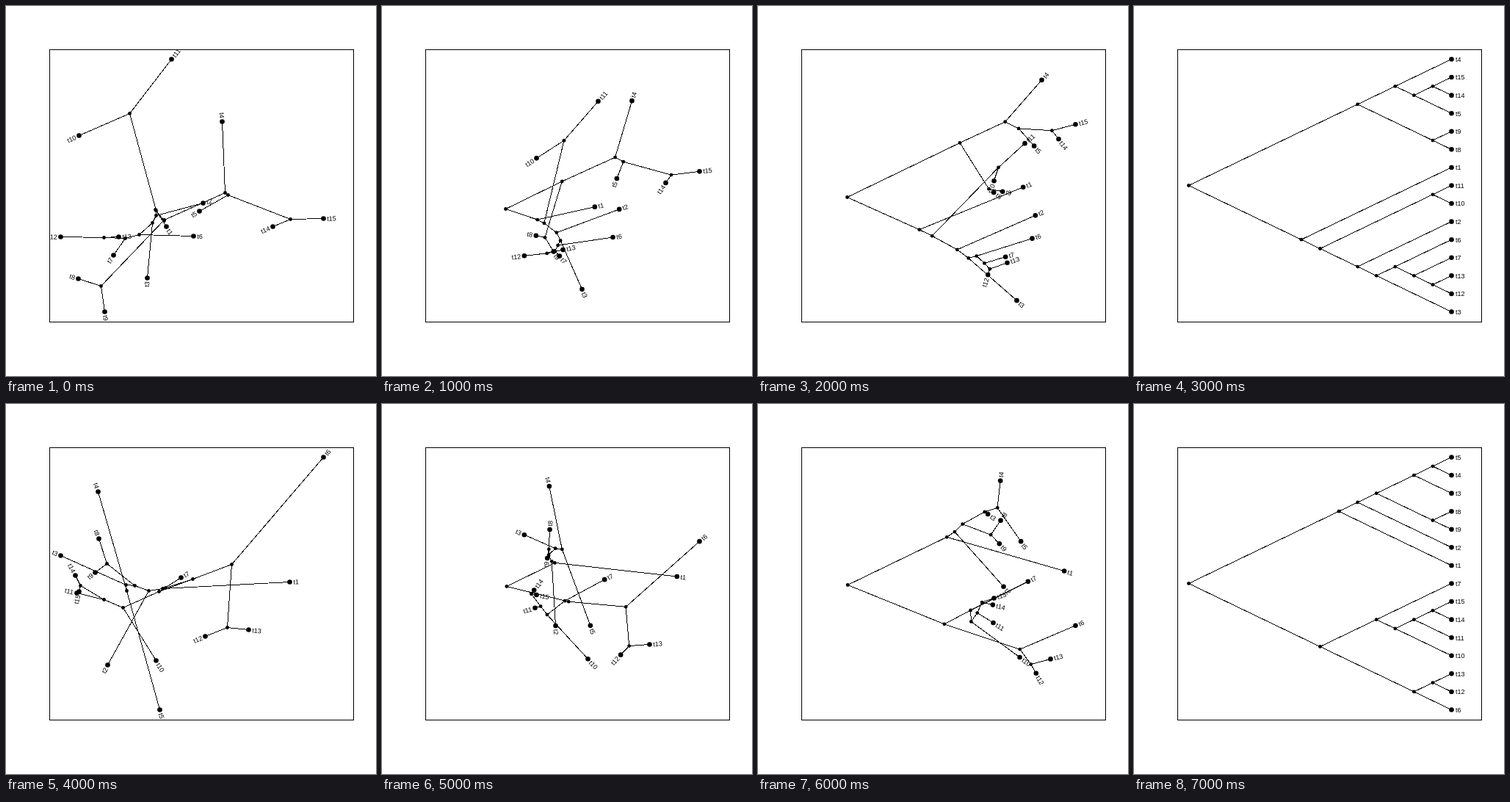
Animation, 504 px wide and 504 px high, one loop 8 s. Source, as an HTML page:

```html
<!DOCTYPE html>
<html lang="en">
<head>
<meta charset="utf-8">
<title>Tree morph</title>
<style>
  html, body { margin: 0; width: 100%; height: 100%; overflow: hidden; background: #fff; }
  svg { display: block; width: 504px; height: 504px; }
  line, rect { stroke: #000; stroke-width: 1; shape-rendering: crispEdges; }
  text { font: 9px Arial, "Liberation Sans", sans-serif; }
  .pose { visibility: hidden; animation: show 8s step-end infinite; }
  @keyframes show {
    0% { visibility: visible; }
    12.5%, 100% { visibility: hidden; }
  }
</style>
</head>
<body>
<svg viewBox="0 0 504 504">
  <clipPath id="clip"><rect x="59" y="59" width="415" height="372"/></clipPath>
  <g id="plot" clip-path="url(#clip)"></g>
  <rect x="59.5" y="59.5" width="414" height="371" fill="none"/>
</svg>
<script>
const STEPS = 4, HOLD = 1;
const LEFT = 74, RIGHT = 432, TOP = 72, BOTTOM = 416, TIPS = 15;

// Unrooted layout: tips are (name, x, y), forks are (x, y, upper, lower).
const tip = (name, x, y) => ({ name, x, y, kids: [] });
const fork = (x, y, ...kids) => ({ x, y, kids });

const trees = [
  fork(215, 292,
    fork(215, 291,
      fork(298, 254,
        tip('t4', 294, 157),
        fork(302, 257,
          fork(387, 290, tip('t15', 432, 289), tip('t14', 363, 300)),
          tip('t5', 263, 279))),
      fork(129, 381, tip('t9', 134, 416), tip('t8', 98, 371))),
    fork(203, 277,
      tip('t1', 218, 300),
      fork(204, 278,
        fork(168, 146, tip('t11', 225, 72), tip('t10', 99, 176)),
        fork(204, 285,
          tip('t2', 268, 268),
          fork(199, 295,
            fork(181, 311,
              tip('t6', 255, 313),
              fork(162, 316,
                tip('t7', 146, 339),
                fork(133, 315, tip('t13', 153, 314), tip('t12', 74, 314)))),
            tip('t3', 192, 370)))))),
  fork(217, 250,
    fork(213, 251,
      fork(194, 254,
        fork(175, 247,
          fork(163, 246,
            fork(164, 254, tip('t5', 209, 416), tip('t4', 125, 119)),
            tip('t3', 74, 206)),
          fork(137, 217, tip('t8', 126, 183), tip('t9', 121, 229))),
        tip('t2', 138, 355)),
      tip('t1', 386, 242)),
    fork(254, 238,
      fork(208, 255,
        tip('t7', 238, 236),
        fork(159, 277,
          fork(133, 266,
            fork(101, 247, tip('t15', 99, 255), tip('t14', 94, 233)),
            tip('t11', 96, 257)),
          tip('t10', 204, 349))),
      fork(307, 218,
        fork(301, 304, tip('t13', 330, 307), tip('t12', 271, 316)),
        tip('t6', 432, 72))))
];

// Cladogram layout: a fork sits midway along its range of tips, further left the more it holds.
function layout(node, first = 0) {
  let next = first;
  for (const kid of node.kids) next = layout(kid, next);
  if (!node.kids.length) next++;
  const size = next - first - 1;
  node.cx = RIGHT - size * (RIGHT - LEFT) / (TIPS - 1);
  node.cy = TOP + (first + size / 2) * (BOTTOM - TOP) / (TIPS - 1);
  return next;
}

function add(parent, tag, attrs, content = '') {
  const el = document.createElementNS('http://www.w3.org/2000/svg', tag);
  for (const key in attrs) el.setAttribute(key, attrs[key]);
  el.textContent = content;
  return parent.appendChild(el);
}

const mix = (a, b, k) => a + (b - a) * k;
const place = (n, k) => [mix(n.x, n.cx, k) + 0.5, mix(n.y, n.cy, k) + 0.5];

function label(group, name, x, y, dx, dy, final) {
  const flip = !final && dx < 0;
  const side = flip ? -1 : 1;
  const turn = final ? 0 : Math.atan2(dy * side, dx * side) * 180 / Math.PI;
  add(group, 'text', {
    x: side * (final ? 5.4 : 4.8),
    y: 3.3,
    'text-anchor': flip ? 'end' : 'start',
    transform: `translate(${x} ${y}) rotate(${turn})`
  }, name);
}

function draw(group, node, k, from) {
  const [x, y] = place(node, k);
  if (from) add(group, 'line', { x1: from[0], y1: from[1], x2: x, y2: y });
  add(group, 'circle', { cx: x, cy: y, r: node.name ? 3.3 : 2.4 });
  if (node.name) label(group, node.name, x, y, x - from[0], y - from[1], k === 1);
  for (const kid of node.kids) draw(group, kid, k, [x, y]);
}

const plot = document.getElementById('plot');
const total = trees.length * STEPS;
trees.forEach((tree, t) => {
  layout(tree);
  for (let s = 0; s < STEPS; s++) {
    const delay = (t * STEPS + s - total) * HOLD;
    const group = add(plot, 'g', { class: 'pose', style: `animation-delay:${delay}s` });
    draw(group, tree, s / (STEPS - 1));
  }
});
</script>
</body>
</html>
```
